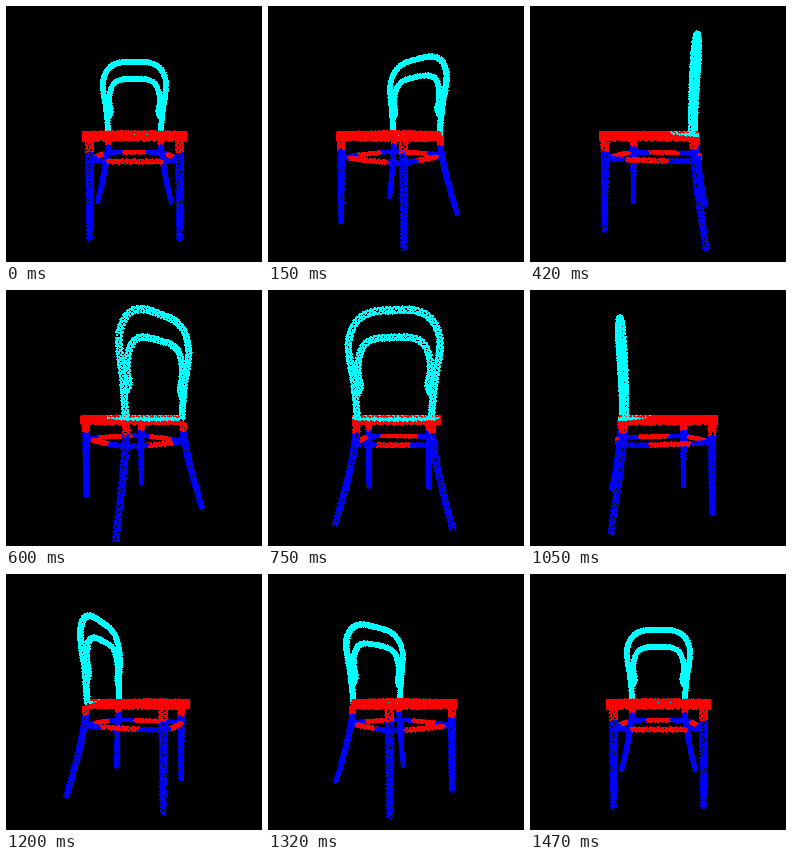
An HTML page with a canvas that plays this animation: 256 px wide and 256 px high, repeating every 1500 ms.

```html
<!DOCTYPE html>
<html lang="en">
<head>
<meta charset="utf-8">
<title>Turning chair</title>
<style>
  html, body { margin: 0; width: 100%; height: 100%; overflow: hidden; background: #000; }
  canvas { display: block; width: 100vw; height: 100vh; image-rendering: pixelated; }
</style>
</head>
<body>
<canvas id="stage" width="256" height="256"></canvas>
<script>
const SIZE = 256, MID = 128, EYE = 198;
const STEP = 30, STEPS = 50;
const DOT = 1.3, DENSITY = 0.16, GOLD = 0.618034;
const CYAN = 0xffffff00, RED = 0xff0000ff, BLUE = 0xffff0000, BLACK = 0xff000000;

const cloud = [];
const add = (x, y, z, color) => cloud.push({ x, y, z, color });

// Visits n evenly spaced places along a path given for t in 0..1.
function walk(path, count, visit) {
  const N = 240, pts = [], len = [0];
  for (let i = 0; i <= N; i++) {
    pts.push(path(i / N));
    if (i) len.push(len[i - 1] + Math.hypot(...pts[i].map((v, k) => v - pts[i - 1][k])));
  }
  const n = Math.round(count(len[N]));
  for (let i = 0, j = 0; i < n; i++) {
    const s = len[N] * (i + 0.5) / n;
    while (j < N - 1 && len[j + 1] < s) j++;
    const a = pts[j], b = pts[j + 1], span = len[j + 1] - len[j] || 1;
    const d = a.map((v, k) => (b[k] - v) / span);
    visit(a.map((v, k) => v + d[k] * (s - len[j])), d, i, s / len[N]);
  }
}

const cross = (a, b) => [a[1] * b[2] - a[2] * b[1], a[2] * b[0] - a[0] * b[2], a[0] * b[1] - a[1] * b[0]];
const unit = v => { const l = Math.hypot(...v) || 1; return v.map(c => c / l); };

function tube(path, r0, r1, paint) {
  walk(path, L => L * Math.PI * (r0 + r1) * DENSITY, (p, d, i, t) => {
    const u = unit(cross(d, Math.abs(d[2]) < 0.7 ? [0, 0, 1] : [0, 1, 0]));
    const v = cross(d, u), r = r0 + (r1 - r0) * t, a = i * GOLD * 2 * Math.PI;
    const [x, y, z] = p.map((c, k) => c + r * (u[k] * Math.cos(a) + v[k] * Math.sin(a)));
    add(x, y, z, paint(x, y, z));
  });
}

// Smooth curve through points.
function spline(pts) {
  const at = i => pts[Math.max(0, Math.min(pts.length - 1, i))];
  return t => {
    const s = t * (pts.length - 1), i = Math.min(Math.floor(s), pts.length - 2), f = s - i;
    return [0, 1].map(k => {
      const [a, b, c, d] = [at(i - 1)[k], at(i)[k], at(i + 1)[k], at(i + 2)[k]];
      return b + f / 2 * (c - a + f * (2 * a - 5 * b + 4 * c - d + f * (3 * (b - c) + d - a)));
    });
  };
}

// Rounded rectangle lying flat at height y.
function loop(wide, flare, deep, z0, y, power) {
  const bend = v => Math.sign(v) * Math.abs(v) ** (2 / power);
  return t => {
    const a = t * 2 * Math.PI, z = z0 + deep * bend(Math.cos(a));
    return [(wide + flare * z) * bend(Math.sin(a)), y, z];
  };
}

// Back: two bent hoops, leaning away from the seat.
function hoop(half, r) {
  const mirror = half.slice(1).reverse().map(([x, y]) => [-x, y]);
  const curve = spline([...mirror, ...half]);
  tube(t => {
    const [x, y] = curve(t);
    return [x, y, -34.5 - 4.5 * Math.max(0, -y / 87) ** 2];
  }, r, r, () => CYAN);
}
hoop([[0, -87], [18, -86], [30.5, -79], [37, -65], [36.8, -51], [33, -27], [30.5, 1]], 2.2);
hoop([[0, -66], [16, -65], [25, -59.5], [29.3, -48], [29.5, -36], [27.8, -27], [31, -19]], 2.1);

// Seat: rim and plate.
const seat = loop(42.6, 0.1, 44.5, 6.5, 0, 3.2);
walk(seat, L => L * 7.2 * 0.4, ([x, , z], d, i) => {
  const y = -2.2 + 7.2 * (i * GOLD % 1);
  const cyan = z < -14 && y > -1 && y < -1 + 3.4 * (-14 - z) / 25;
  add(x, y, z, cyan ? CYAN : RED);
});
walk(seat, () => 900, ([x, , z], d, i) => {
  const k = Math.sqrt(i * GOLD % 1), depth = 6.5 + (z - 6.5) * k;
  add(x * k, -2.1, depth, depth < -16 ? CYAN : RED);
});

// Legs and the stretcher between them.
for (const side of [-1, 1]) {
  tube(t => [side * 36, 4 + 80 * t, 39.5], 2.9, 1.7, (x, y) => y < 14.5 ? RED : BLUE);
  tube(t => {
    const y = 3 + 81 * t, s = Math.max(0, (y - 12) / 72) ** 1.3;
    return [side * (31 + 14.5 * s), y, -36 - 10 * s];
  }, 2.5, 1.8, (x, y) => y < 12 ? RED : BLUE);
}
tube(loop(36, 0, 41, 1, 21.3, 4.5), 1.5, 1.5, (x, y, z) =>
  Math.min(Math.abs(x), Math.abs(z)) < 18 + 0.1 * z ? RED : BLUE);

const ctx = document.getElementById("stage").getContext("2d");
const image = ctx.createImageData(SIZE, SIZE);
const pixels = new Uint32Array(image.data.buffer);
const depth = new Float32Array(SIZE * SIZE);

function draw(angle) {
  const c = Math.cos(angle), s = Math.sin(angle);
  pixels.fill(BLACK);
  depth.fill(-1e9);
  for (const p of cloud) {
    const z = p.x * s + p.z * c, k = EYE / (EYE - z);
    const px = MID + (p.x * c - p.z * s) * k, py = MID + p.y * k;
    for (let y = Math.ceil(py - DOT); y <= py + DOT; y++) {
      for (let x = Math.ceil(px - DOT); x <= px + DOT; x++) {
        if (x < 0 || y < 0 || x >= SIZE || y >= SIZE) continue;
        const at = y * SIZE + x;
        if ((x - px) ** 2 + (y - py) ** 2 > DOT * DOT || z < depth[at]) continue;
        depth[at] = z;
        pixels[at] = p.color;
      }
    }
  }
  ctx.putImageData(image, 0, 0);
}

const start = performance.now();
let shown = -1;
function tick() {
  const step = Math.floor((performance.now() - start) / STEP) % STEPS;
  if (step !== shown) draw(2 * Math.PI * step / (STEPS - 1));
  shown = step;
  requestAnimationFrame(tick);
}
tick();
</script>
</body>
</html>
```
